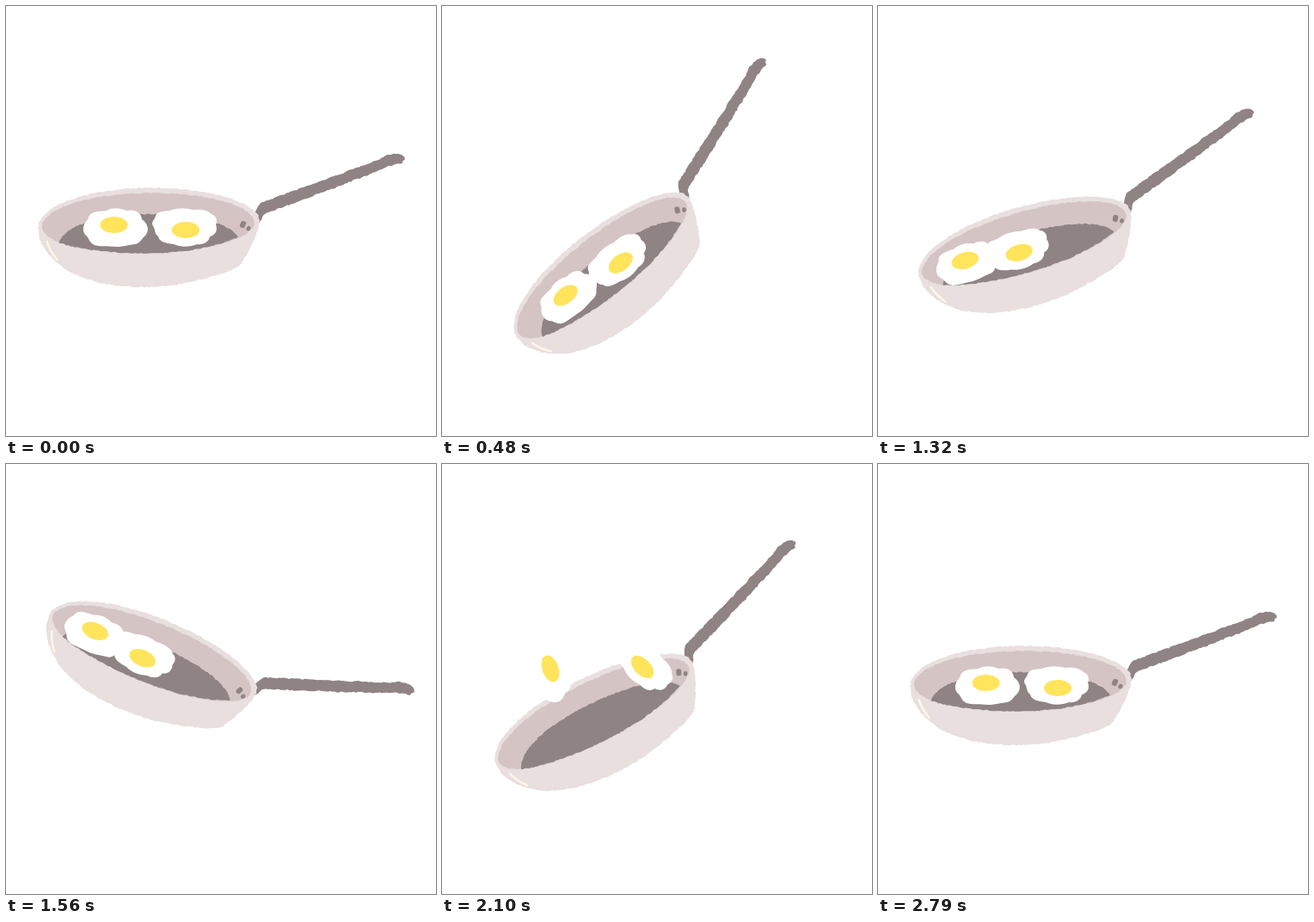
An HTML page that plays this animation: 500 by 500 pixels, repeating every 3.15 s.

```html
<!DOCTYPE html>
<html lang="en">
<head>
<meta charset="utf-8">
<title>Flipping eggs</title>
<style>
  html, body { margin: 0; width: 100%; height: 100%; overflow: hidden; background: #fff; }
  svg { display: block; width: 100vw; height: 100vh; }
</style>
</head>
<body>
<svg viewBox="0 0 500 500">
  <g id="pan">
    <path class="rough" fill="#8f8483" d="M287 247C290 237 293 231 298 228L380 198.500L436 177.500C444 171 455 170 462 174L464 178L460 182.500C450 185 444 186 437 190L381 212L302 241C299 243 298 246 294 253Z"/>
    <path class="rough" fill="#e8dfde" d="M37.500 258C37.500 232 95 211.500 170 211.500C240 211.500 295 230 294.500 250C294 262 286 277 278 292C273 302 271 304 262 307C235 318 195 327 160 327C120 327 85 318 65 303C48 290 37.500 275 37.500 258Z"/>
    <path class="rough" fill="#d4c4c3" d="M42 256C44 234 100 217.500 170 217.500C240 217.500 289 234 289 252C288 262 275 268 262 273C230 283 200 288 160 288C115 287 80 282 62 275C50 270 42 265 42 256Z"/>
    <path class="rough" fill="#8f8483" d="M62 275C66 257 105 242 165 242C225 242 262 254 270 269C235 283 200 287.500 160 287.500C115 287 80 282 62 275Z"/>
    <rect x="272.500" y="250" width="6" height="8" rx="2.500" fill="#8f8483" transform="rotate(25 275.500 254)"/>
    <rect x="279.500" y="256" width="4.500" height="5.500" rx="2" fill="#8f8483" transform="rotate(35 282 259)"/>
    <path d="M47.500 274Q51 285 59.500 295" fill="none" stroke="#fdf6e4" stroke-width="2.600" stroke-linecap="round"/>
  </g>
  <g id="left">
    <path fill="#fff" d="M90 262C89 252 95 250 96 246C98 238 110 239 117 238C124 234 133 235 140 238C150 236 157 240 158 248C166 254 167 262 161 268C157 271 156 276 150 277C140 278 136 280 128 280C118 279 108 280 103 278C96 275 97 269 92 266Z"/>
    <ellipse cx="125.500" cy="254.500" rx="16" ry="9.500" fill="#ffe45c"/>
  </g>
  <g id="right">
    <path fill="#fff" d="M171 256C168 250 173 249 174 244C176 238 184 239 190 238C200 234 210 235 217 237C226 236 235 237 239 242C245 244 246 250 244 254C247 262 242 267 237 268C236 275 228 278 222 277C212 281 202 280 195 277C186 276 178 274 177 268C172 264 174 260 171 256Z"/>
    <ellipse cx="209" cy="260.500" rx="16" ry="9.500" fill="#ffe45c"/>
  </g>
</svg>
<script>
const LOOP = 3150, STEP = 30;
const PIVOT_X = 250, PIVOT_Y = 248.5;
const LAUNCH = 1605, APEX = 1830, DROP = 2100, LAND = 2160;

const PAN_KEYS = [[0, 0], [835, -65.3], [1006, -65.3], [1605, 29.7],
                  [1830, 29.7], [2122, -30.5], [2310, 0]];

const eggs = [
  { id: "left", home: [125.5, 254.5],
    slide: [[0, 0], [480, -13.5], [990, -31.5]],
    lift: [[0, 0], [480, -1], [960, -6], [1320, 0]],
    apex: [164, 105, 20], drop: [126, 238, 70], settled: 2790 },
  { id: "right", home: [209, 260.5],
    slide: [[0, 0], [480, -23], [990, -52]],
    lift: [[0, 0], [480, 2]],
    apex: [268.5, 132.5, 40], drop: [233, 236, 45], settled: 2700 }
];

const byId = id => document.getElementById(id);

function linear(keys, t) {
  for (let i = 1; i < keys.length; i++) {
    const [t0, a] = keys[i - 1], [t1, b] = keys[i];
    if (t < t1) return a + (b - a) * (t - t0) / (t1 - t0);
  }
  return keys[keys.length - 1][1];
}

const panAngle = t => linear(PAN_KEYS, t);

function spin([x, y, a], degrees) {
  const r = degrees * Math.PI / 180, c = Math.cos(r), s = Math.sin(r);
  const dx = x - PIVOT_X, dy = y - PIVOT_Y;
  return [PIVOT_X + dx * c - dy * s, PIVOT_Y + dx * s + dy * c, a + degrees];
}

// Parabola through the launch, apex and drop values.
function arc(p, q, r, t) {
  const s1 = (q - p) / (APEX - LAUNCH), s2 = (r - q) / (DROP - APEX);
  const bend = (s2 - s1) / (DROP - LAUNCH);
  return p + s1 * (t - LAUNCH) + bend * (t - LAUNCH) * (t - APEX);
}

function eggPose(egg, t) {
  const [hx, hy] = egg.home;
  if (t <= LAUNCH) {
    return spin([hx + linear(egg.slide, t), hy + linear(egg.lift, t), 0], panAngle(t));
  }
  if (t <= LAND) {
    const start = eggPose(egg, LAUNCH);
    return start.map((v, i) => arc(v, egg.apex[i], egg.drop[i], t));
  }
  const landed = spin(eggPose(egg, LAND), -panAngle(LAND));
  const rest = Math.max(0, (egg.settled - t) / (egg.settled - LAND)) ** 3;
  const end = [hx, hy, 0];
  return spin(end.map((v, i) => v + (landed[i] - v) * rest), panAngle(t));
}

// Crayon-like edges: resample each outline with a small seeded jitter.
let seed = 7;
function random() {
  seed = (seed * 16807) % 2147483647;
  return seed / 2147483647 - 0.5;
}
for (const path of document.querySelectorAll(".rough")) {
  const length = path.getTotalLength(), points = [];
  for (let d = 0; d < length; d += 2.5) {
    const p = path.getPointAtLength(d);
    points.push((p.x + random() * 1.3).toFixed(2) + " " + (p.y + random() * 1.3).toFixed(2));
  }
  path.setAttribute("d", "M" + points.join("L") + "Z");
}

function render(t) {
  byId("pan").setAttribute("transform", `rotate(${panAngle(t)} ${PIVOT_X} ${PIVOT_Y})`);
  for (const egg of eggs) {
    const [x, y, a] = eggPose(egg, t), [hx, hy] = egg.home;
    byId(egg.id).setAttribute("transform",
      `translate(${x} ${y}) rotate(${a}) translate(${-hx} ${-hy})`);
  }
}

const began = performance.now();
function tick() {
  const t = (performance.now() - began) % LOOP;
  render(Math.floor(t / STEP) * STEP);
  requestAnimationFrame(tick);
}
tick();
</script>
</body>
</html>
```
